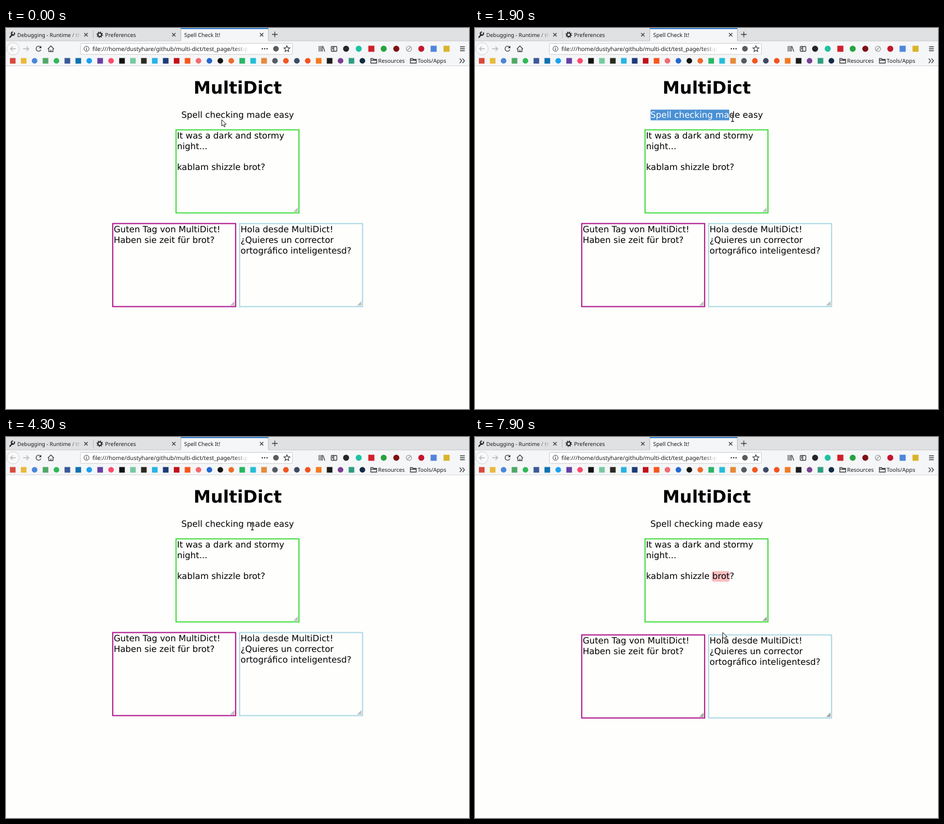
Recreate the animation shown at these times as an HTML page. Size 825 by 679 pixels, loop 8000 ms.

```html
<!DOCTYPE html>
<html lang="en">
<head>
<meta charset="utf-8">
<title>Spell Check It!</title>
<style>
html, body { margin: 0; width: 100%; height: 100%; overflow: hidden; background: #fefefd; }
svg { display: block; }
text { font-family: "DejaVu Sans", sans-serif; font-size: 15.36px; text-rendering: geometricPrecision; white-space: pre; }
.ui text { font-family: "Noto Sans", "Open Sans", sans-serif; font-size: 9.9px; fill: #1c1c1e; }
.line { fill: none; stroke: #3c3c3e; stroke-width: 1.3; }
h1 { all: unset; }
</style>
</head>
<body>
<svg id="stage" width="825" height="679" viewBox="0 0 825 679">
  <defs>
    <linearGradient id="fadeTab"><stop stop-color="#e0e1e3" stop-opacity="0"/><stop offset="1" stop-color="#e0e1e3"/></linearGradient>
    <linearGradient id="fadeUrl"><stop stop-color="#fff" stop-opacity="0"/><stop offset="1" stop-color="#fff"/></linearGradient>
    <clipPath id="selClip"><rect id="selArea" x="312.6" y="145" width="0" height="20"/></clipPath>
    <g id="close"><path class="line" d="M-3-3L3 3M3-3L-3 3"/></g>
    <g id="folder"><path class="line" stroke-width="1.1" d="M-5 4V-4H-1L0-2.5H5.500V4ZM-5-1H5.500"/></g>
  </defs>

  <g class="ui">
    <rect width="825" height="23" fill="#e0e1e3"/>
    <rect y="23" width="825" height="44" fill="#f5f6f7"/>
    <rect y="22.500" width="825" height="1" fill="#c9cacc"/>
    <rect x="311" width="157" height="24" fill="#f5f6f7"/>
    <rect x="311" width="157" height="2" fill="#3584d0"/>
    <path d="M155.500 4V19M311.500 1V23M467.500 1V23" stroke="#b9babd" fill="none"/>
    <rect y="67" width="825" height="1" fill="#d6d7d9"/>

    <path d="M7 16.500L11.500 11.500" stroke="#222" stroke-width="2.200" stroke-linecap="round"/>
    <path d="M14.600 8.200A2.900 2.900 0 1 1 12.300 7.100" fill="none" stroke="#222" stroke-width="2"/>
    <circle cx="167" cy="12" r="3.200" fill="none" stroke="#222" stroke-width="1.800"/>
    <circle cx="167" cy="12" r="4.800" fill="none" stroke="#222" stroke-width="1.800" stroke-dasharray="1.700 2.070"/>
    <text x="20" y="15.600" style="font-size:9.5px">Debugging - Runtime / th</text>
    <rect x="112" y="3" width="22" height="18" fill="url(#fadeTab)"/>
    <text x="176.500" y="15.600">Preferences</text>
    <text x="317.500" y="15.600" style="font-size:9.8px">Spell Check It!</text>
    <use href="#close" x="142.500" y="12"/>
    <use href="#close" x="299" y="12"/>
    <use href="#close" x="455.500" y="12"/>
    <path class="line" d="M474 11.500H484M479 6.500V16.500"/>

    <circle cx="12.500" cy="37" r="11" fill="#f9f9fa" stroke="#cfd0d2"/>
    <path class="line" style="stroke:#b4b5b8" d="M17.500 37H8M12 33L8 37L12 41M30.500 37H40.500M36.500 33L40.500 37L36.500 41"/>
    <path class="line" d="M61.600 34A4.500 4.500 0 1 0 62.300 38.500"/>
    <path d="M63 31.500V36H58.500Z" fill="#3c3c3e"/>
    <path class="line" d="M74.500 37.500L80 32L85.500 37.500M76.300 37V42H83.700V37M80 42V38.500"/>

    <rect x="132.500" y="27.500" width="378" height="19.500" rx="2" fill="#fff" stroke="#cbccce"/>
    <circle cx="143.500" cy="37" r="4.500" class="line" style="stroke-width:1"/>
    <path class="line" style="stroke-width:1.200" d="M143.500 36.300V39.700M143.500 34.200V35.300"/>
    <text x="154" y="40.700" style="font-size:10.3px">file:///home/dustyhare/github/multi-dict/test_page/test-p</text>
    <rect x="405" y="29" width="27" height="17" fill="url(#fadeUrl)"/>
    <path d="M456.800 37H465.500" stroke="#3c3c3e" stroke-width="2.500" stroke-linecap="round" stroke-dasharray="0 4.200"/>
    <circle cx="481" cy="37" r="5" fill="#5b5b5e"/>
    <path id="star" class="line" style="stroke-width:1.200"/>

    <path class="line" d="M558 32V42M561 32V42M563.500 32V42M564.800 32.500L568 42"/>
    <rect x="579.500" y="33" width="10" height="8.500" rx="1" class="line"/>
    <path class="line" d="M584 33V41.500M581 35.500H583M581 37.500H583"/>
    <g id="addons"></g>
    <circle cx="718" cy="37" r="4.700" fill="none" stroke="#9a9b9e" stroke-width="1.300"/>
    <path d="M714.800 40.200L721.200 33.800" stroke="#9a9b9e" stroke-width="1.300"/>
    <path class="line" d="M809 33.500H817.500M809 37H817.500M809 40.500H817.500"/>

    <g id="marks"></g>
    <use href="#folder" x="655" y="58.500"/>
    <use href="#folder" x="725.500" y="58.500"/>
    <text x="663" y="61.800">Resources</text>
    <text x="733.500" y="61.800">Tools/Apps</text>
    <path class="line" d="M808.500 54.500L812 58.500L808.500 62.500M813.500 54.500L817 58.500L813.500 62.500"/>
  </g>

  <text x="412.800" y="117.200" text-anchor="middle" style="font-size:30.72px;font-weight:700">MultiDict</text>
  <text id="tagline" x="312.600" y="160.300">Spell checking made easy</text>
  <g clip-path="url(#selClip)">
    <rect x="312.600" y="145.500" width="202" height="19" fill="#4a90d4"/>
    <text x="312.600" y="160.300" fill="#fff">Spell checking made easy</text>
  </g>

  <rect id="mark" x="421.800" y="239" width="32" height="19" rx="4" fill="#f9bfc1"/>
  <g id="main"></g>
  <g id="lower"></g>
  <rect id="caret" width="1.300" height="19"/>

  <g id="arrow"><path d="M.5.500V11.600L3 9.300L4.900 13.300L6.700 12.500L4.900 8.600H8.400Z" fill="#fff" stroke="#222" stroke-width="1"/></g>
  <g id="beam" fill="none">
    <path d="M-2.600-5.500H2.600M0-5.500V5.500M-2.600 5.500H2.600" stroke="#fff" stroke-width="2.600" opacity=".65"/>
    <path d="M-2.600-5.500H2.600M0-5.500V5.500M-2.600 5.500H2.600" stroke="#222" stroke-width="1.300"/>
  </g>
</svg>

<script>
const LOOP = 8000;
const $ = id => document.getElementById(id);

function add(parent, tag, attrs, text) {
  const el = document.createElementNS("http://www.w3.org/2000/svg", tag);
  for (const key in attrs) el.setAttribute(key, attrs[key]);
  if (text) el.textContent = text;
  return parent.appendChild(el);
}

function icon(parent, x, y, shape, color, r) {
  if (shape === "o") add(parent, "circle", { cx: x, cy: y, r, fill: color });
  else add(parent, "rect", { x: x - r, y: y - r, width: 2 * r, height: 2 * r, fill: color });
}

// Shape letter (o circle, s square) followed by its colour.
const marks = ("s#d94a3d s#e8b93a o#4a86d8 s#50a865 o#2fb956 s#3b5998 s#0d72b0 o#1da1f2 " +
  "s#6441a5 o#fd4a6b s#111111 s#76c9a2 s#2b2a20 s#28b4e6 s#1d3a78 s#c3101a s#f8551c " +
  "o#f36a70 o#2468d0 o#161616 o#ee6a2c s#29b765 s#25bdd8 s#e58a3a o#555b62 o#f4551f " +
  "o#3c4a66 o#f4511e s#f47a20 s#1b1b1b o#7a3f92 s#2d9c80 o#0f2b46").split(" ");
marks.forEach((m, i) => icon($("marks"), 12 + i * 19.47, 58.5, m[0], m.slice(1), 5));

[[606, "o#24262b"], [628.5, "o#1fc1a4"], [651, "s#d0202c"], [673, "o#27a33f"], [695.5, "o#7d1016"],
 [740, "o#c4162e"], [762, "s#4f86dc"], [785, "s#d9b42c"]]
  .forEach(([x, m]) => icon($("addons"), x, 37, m[0], m.slice(1), 5.4));

$("star").setAttribute("d", "M" + Array.from({ length: 10 }, (_, i) => {
  const r = i % 2 ? 2.6 : 5.6, a = (i / 5 - 0.5) * Math.PI;
  return (500.5 + r * Math.cos(a)).toFixed(2) + " " + (37.3 + r * Math.sin(a)).toFixed(2);
}).join("L") + "Z");

function field(parent, x, y, color, lines) {
  add(parent, "rect", { x: x + 1, y: y + 1, width: 219, height: 148, fill: "none", stroke: color, "stroke-width": 2 });
  lines.forEach((line, i) => add(parent, "text", { x: x + 2.7, y: y + 16.7 + i * 18.75 }, line));
  const gx = x + 218, gy = y + 147;
  add(parent, "path", { d: `M${gx} ${gy - 7}V${gy}H${gx - 7}Z`, fill: "#aaa", class: "grip", opacity: 0.35 });
  add(parent, "path", {
    d: [7, 4.5, 2].map(n => `M${gx - n} ${gy}L${gx} ${gy - n}`).join(""),
    stroke: "#8a8a8a", "stroke-width": 0.9
  });
}
field($("main"), 302, 180.5, "#41dc3c", ["It was a dark and stormy", "night...", "", "kablam shizzle brot?"]);
field($("lower"), 189.2, 347.5, "#ae1289", ["Guten Tag von MultiDict!", "Haben sie zeit für brot?"]);
field($("lower"), 415.3, 347.5, "#abd8e2", ["Hola desde MultiDict!", "¿Quieres un corrector", "ortográfico inteligentesd?"]);

// Pointer: time, shape, x, y
const pointer = [
  [0, "arrow", 384, 163], [400, "beam", 374, 160], [500, "beam", 361, 157], [600, "beam", 349, 156],
  [700, "beam", 339, 156], [800, "beam", 332, 157], [900, "beam", 327.5, 157], [1100, "beam", 314.5, 157],
  [1500, "beam", 323.5, 157], [1600, "beam", 345, 158], [1700, "beam", 381, 159], [1800, "beam", 422, 160],
  [1900, "beam", 459, 161], [2000, "beam", 475, 161], [2100, "beam", 487, 160], [2200, "beam", 497, 160],
  [2300, "beam", 503.5, 160], [2400, "beam", 509, 160], [2500, "arrow", 514, 157], [2700, "arrow", 521, 157],
  [2800, "arrow", 524, 157], [3100, "arrow", 524.6, 157], [3300, "beam", 447, 116], [3400, "beam", 440, 113],
  [3600, "beam", 436, 112], [3700, "beam", 432, 111], [3800, "beam", 430.5, 111], [4100, "beam", 431.5, 117],
  [4300, "beam", 439, 160], [4400, "beam", 452, 220], [4500, "beam", 459.5, 253], [4900, "beam", 456, 274],
  [5000, "beam", 449, 310], [5100, "beam", 443.5, 340], [5200, "beam", 441.5, 350.5],
  [6000, "arrow", 439.5, 348.3], [6200, "arrow", 441, 347.8]
];
// Selected letters: time, count
const selection = [[0, 0], [1500, 1], [1600, 3], [1700, 7], [1800, 12], [1900, 17], [2000, 19],
  [2100, 21], [2200, 22], [2300, 24], [2700, 0]];
// Caret: time, x, y (no x: hidden)
const caret = [[0], [4900, 462, 239], [6700], [7000, 454, 239], [7400, 305, 239], [7700, 305, 220], [7900]];

const at = (steps, t) => steps.findLast(s => s[0] <= t);
const show = (el, on) => el.setAttribute("visibility", on ? "visible" : "hidden");

function draw(t) {
  const [, shape, x, y] = at(pointer, t);
  for (const id of ["arrow", "beam"]) show($(id), id === shape);
  $(shape).setAttribute("transform", `translate(${x} ${y})`);

  const count = at(selection, t)[1];
  const end = count ? $("tagline").getEndPositionOfChar(count - 1).x : 312.6;
  $("selArea").setAttribute("width", end - 312.6);

  const [, cx, cy] = at(caret, t);
  show($("caret"), cx);
  if (cx) {
    $("caret").setAttribute("x", cx);
    $("caret").setAttribute("y", cy);
  }

  const checked = t >= 6000;
  show($("mark"), checked);
  $("lower").setAttribute("transform", `translate(0 ${checked ? 4.2 : 0})`);
  document.querySelectorAll(".grip").forEach(g => g.setAttribute("opacity", checked ? 0.9 : 0.35));
}

const start = performance.now();
function tick() {
  draw((performance.now() - start) % LOOP);
  requestAnimationFrame(tick);
}
tick();
</script>
</body>
</html>
```
